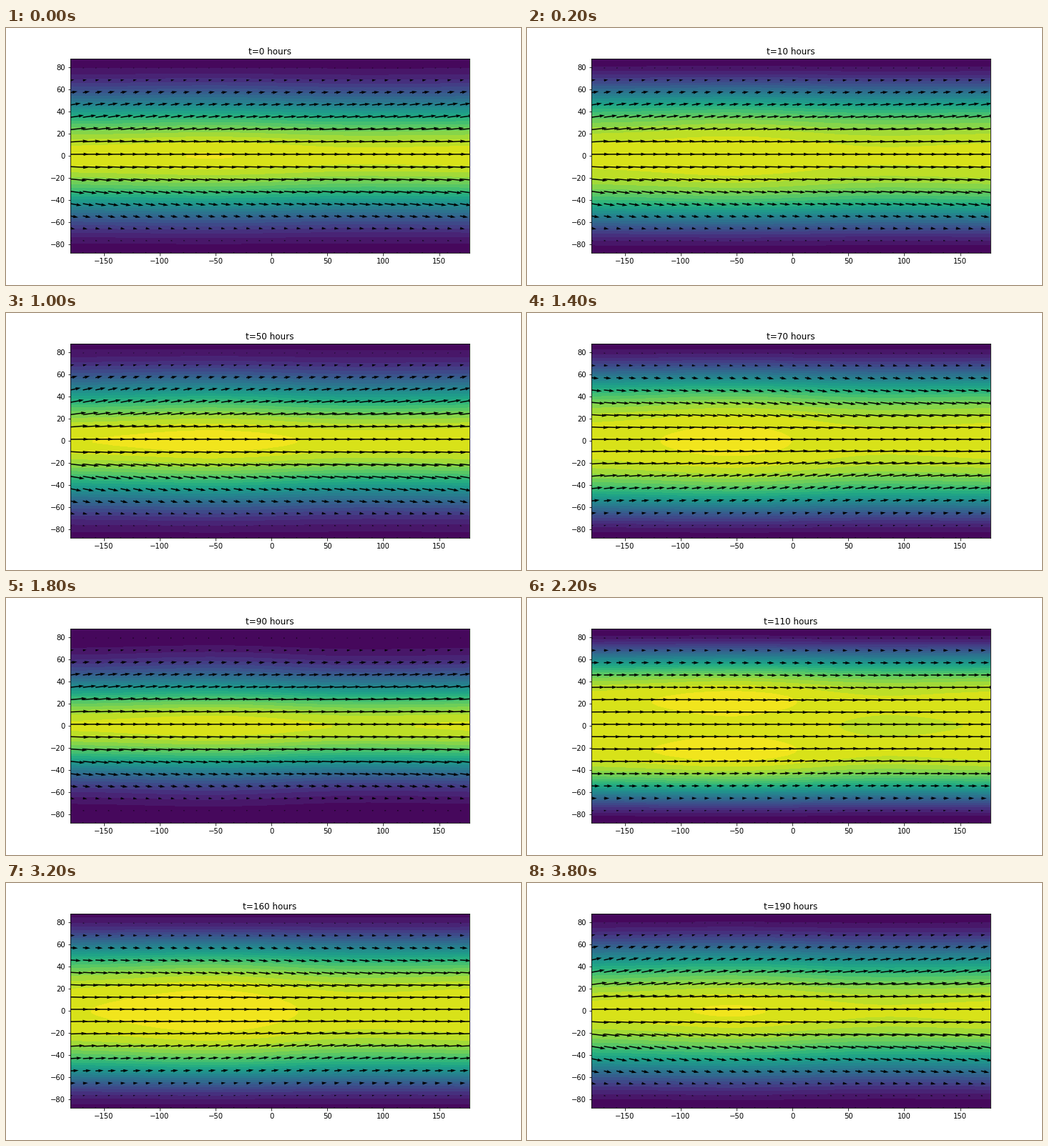
A matplotlib script that plays this animation: 720x360 px, repeating every 4 s.

```python
import numpy as np
import matplotlib.pyplot as plt
from matplotlib.animation import FuncAnimation

FRAMES = 20
TAU = 2 * np.pi

# T42 Gaussian grid
lon = -180 + 2.8125 * np.arange(128)
lat = np.degrees(np.arcsin(np.polynomial.legendre.leggauss(64)[0]))
L, P = np.meshgrid(np.radians(lon), np.radians(lat))
x = np.sin(P) ** 2
levels = np.linspace(0, 1, 26)


def wave(angle, shift):
    return np.cos(angle - np.radians(shift))


def state(k):
    """Normalised height and wind after k steps of ten hours."""
    phase = TAU * (0.216 * k - 0.105)
    s = np.sin(phase)
    spread = (0.04 + 0.1 * s + 0.13 * s ** 3 + 0.002 * k
              - 0.04 * np.cos(TAU * 0.28 * (k - 16)))
    crest = 0.946 + 0.017 * np.cos(TAU * 0.09 * (k - 16)) + 0.018 * np.exp(-k)
    amp = 0.02 - 0.007 * np.exp(-k / 2)

    ridge = 0.9 * wave(L, -68) - 0.2 * wave(2 * L, 100)
    h = crest - 0.94 * x + 4 * spread * x * (1 - x)
    h += amp * ridge * (1 - x) * (1 + 4 * x)

    u = np.cos(P) ** (1.55 - 0.8 * spread) * (1 - 0.09 * wave(L, -60))
    swing = np.cos(phase) - 0.22 * wave(L, 25)
    v = 0.155 * np.sin(2 * P) * np.cos(P) * swing
    return np.clip(h, 0.001, 0.999), u, v


fig, ax = plt.subplots(figsize=(10, 5), dpi=72)
fig.subplots_adjust(left=0.125, right=0.9, bottom=0.125, top=0.88)


def draw(k):
    ax.clear()
    h, u, v = state(k)
    ax.contourf(lon, lat, h, levels=levels, cmap="viridis", vmin=0, vmax=1)
    n = slice(None, None, 4)
    ax.quiver(lon[n], lat[n], u[n, n], v[n, n])
    ax.set_xlim(lon[0], lon[-1])
    ax.set_ylim(lat[0], lat[-1])
    ax.set_title(f"t={10 * k} hours")
    return []


anim = FuncAnimation(fig, draw, frames=FRAMES, init_func=lambda: [],
                     interval=200, repeat=True, repeat_delay=0)
plt.show()
```
